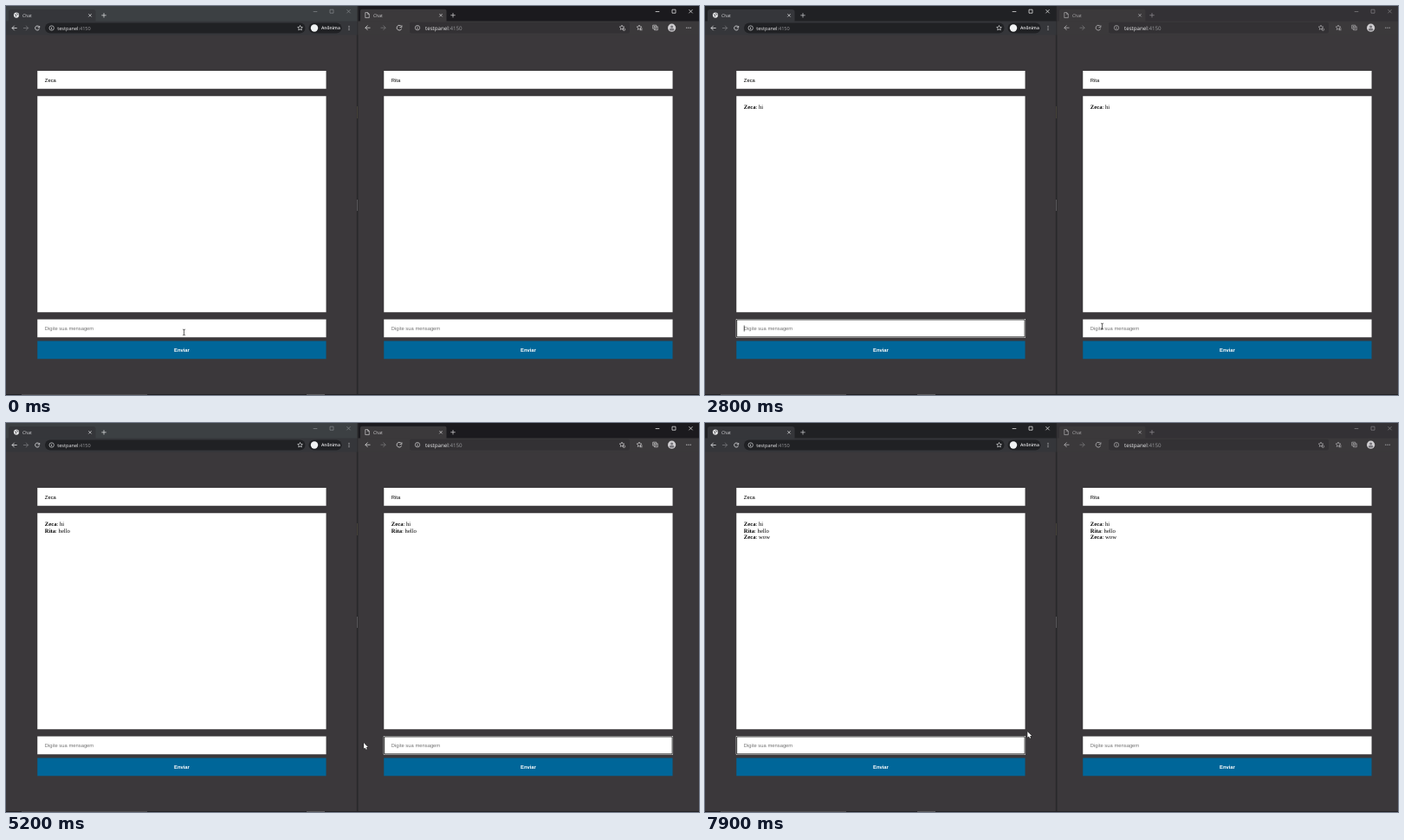
An HTML page with a canvas for the animation above (8000 ms loop, 800 px wide and 450 px high).

```html
<!DOCTYPE html>
<html lang="pt-BR">
<head>
<meta charset="utf-8">
<title>Chat</title>
<style>
html, body { margin: 0; width: 100%; height: 100%; overflow: hidden; background: #3b383b; }
canvas { display: block; width: 800px; height: 450px; }
</style>
</head>
<body>
<canvas id="stage" width="800" height="450"></canvas>
<script>
const ctx = document.getElementById('stage').getContext('2d');
const LOOP = 8000, STEP = 100;
const SANS = '"Liberation Sans", Arial, sans-serif';
const SERIF = '"Liberation Serif", Times, serif';
const UI = '"Open Sans", "Noto Sans", sans-serif';
const HOST = 'testpanel', PORT = ':4150';
const USERS = ['Zeca', 'Rita'];
const MESSAGES = [[1700, 'Zeca', 'hi'], [4600, 'Rita', 'hello'], [7100, 'Zeca', 'wow']];

// [time, window, typed text]; every entry also restarts the caret blink
const INPUT = [
  [300, 0, ''], [1000, 0, 'h'], [1100, 0, 'hi'], [1700, 0, ''],
  [2900, 1, ''], [3600, 1, 'h'], [3700, 1, 'he'], [3900, 1, 'hel'],
  [4000, 1, 'hell'], [4200, 1, 'hello'], [4600, 1, ''],
  [5800, 0, ''], [6400, 0, 'w'], [6500, 0, 'wo'], [6800, 0, 'wow'], [7100, 0, '']
];
const ACTIVE = [[0, 1], [200, 0], [2900, 1], [5700, 0]];
const POINTER = [
  [0, 205.5, 377.5], [200, 202, 373.5], [2200, 202, 373.5], [2800, 458.5, 370.5],
  [3000, 456, 370], [4900, 456, 370], [5200, 413, 370.5], [5700, 152, 367.5],
  [5800, 150.5, 367], [7500, 150.5, 367], [7900, 372.3, 357.5]
];

const last = (list, t) => list.filter(k => k[0] <= t).pop();

function box(x, y, w, h, color, r = 0) {
  ctx.fillStyle = color;
  ctx.beginPath();
  ctx.roundRect(x, y, w, h, r);
  ctx.fill();
}

function disc(x, y, r, color) {
  ctx.fillStyle = color;
  ctx.beginPath();
  ctx.arc(x, y, r, 0, 7);
  ctx.fill();
}

function ring(x, y, r, color, width = 0.7, from = 0, to = 7) {
  ctx.strokeStyle = color;
  ctx.lineWidth = width;
  ctx.beginPath();
  ctx.arc(x, y, r, from, to);
  ctx.stroke();
}

function path(d, x, y, color, width = 0.7) {
  ctx.save();
  ctx.translate(x, y);
  ctx.strokeStyle = color;
  ctx.lineWidth = width;
  ctx.stroke(new Path2D(d));
  ctx.restore();
}

function text(s, x, y, font, color) {
  ctx.font = font;
  ctx.fillStyle = color;
  ctx.fillText(s, x, y);
  return x + ctx.measureText(s).width;
}

const cross = (x, y, r, c) => path(`M${-r} ${-r}L${r} ${r}M${r} ${-r}L${-r} ${r}`, x, y, c);
const plus = (x, y, c) => path('M-2.7 0H2.7M0 -2.7V2.7', x, y, c);

function arrow(x, y, dir, color) {
  path(`M${3 * dir} 0H${-2.7 * dir}M0 -2.7L${-2.7 * dir} 0L0 2.7`, x, y, color, 0.8);
}

function reload(x, y, r, color) {
  ring(x, y, r, color, 0.8, 0.4, 5.6);
  path(`M${r} ${-r}V-0.5H0.5`, x, y, color, 0.8);
}

function star(x, y, r, color) {
  let d = '';
  for (let i = 0; i < 10; i++) {
    const a = i * Math.PI / 5 - Math.PI / 2, q = i % 2 ? r * 0.48 : r;
    d += (i ? 'L' : 'M') + q * Math.cos(a) + ' ' + q * Math.sin(a);
  }
  path(d + 'Z', x, y, color, 0.65);
}

function info(x, y, color) {
  ring(x, y, 2.7, color, 0.65);
  box(x - 0.35, y - 0.4, 0.7, 1.9, color);
  box(x - 0.35, y - 1.6, 0.7, 0.7, color);
}

function controls(x, color) {
  path('M-2.3 0.3H2.3', x, 6.2, color);
  path('M-2 -2H2V2H-2Z', x + 19, 6.2, color);
  cross(x + 38.5, 6.2, 2.1, color);
}

function address(x, y, size) {
  const font = `${size}px ${UI}`;
  text(PORT, text(HOST, x, y, font, '#e8e8ea'), y, font, '#98999c');
}

function leftBrowser(active) {
  const ink = '#e4e5e7';
  box(0, 0, 405.5, 18, active ? '#202124' : '#3c4043');
  box(3, 4, 100.5, 15, '#35363a', [3, 3, 0, 0]);
  box(0, 17.5, 405.5, 16, '#35363a');
  disc(12, 10.6, 3.1, '#e4e5e7');
  path('M-2 -0.9L0 0L-0.8 2M0.6 -2.4L1 -0.9L2.6 -0.4', 12, 10.6, '#47484c', 0.8);
  text('Chat', 19, 12.6, `5px ${UI}`, '#dfe0e3');
  cross(97, 10.8, 1.7, ink);
  plus(113, 10.8, active ? '#cfd0d3' : ink);
  controls(357, active ? '#f4f4f4' : '#85888b');
  arrow(9.7, 25.5, 1, ink);
  arrow(23, 25.5, -1, '#77787b');
  reload(36.2, 25.5, 2.5, ink);
  box(45, 19.6, 300.5, 11.8, '#202124', 5.9);
  info(52.7, 25.5, ink);
  address(59.2, 27.5, 5.6);
  star(339.5, 25.5, 3, ink);
  box(349.5, 19.6, 38, 11.8, '#202124', 5.9);
  disc(356, 25.5, 4.2, '#f1f3f4');
  text('Anônima', 364, 27.3, `600 5px ${UI}`, '#eeeef0');
  for (const dy of [-2, 0, 2]) disc(396, 25.5 + dy, 0.6, ink);
}

function rightBrowser(active) {
  const ink = active ? '#d8d7d9' : '#b5b4b6';
  const bar = '#3b393b';
  box(406.5, 0, 393.5, 18, active ? '#1b1a1e' : '#333135');
  box(409, 3.7, 99.5, 14.5, bar, [2, 2, 0, 0]);
  box(406.5, 17.5, 393.5, 16, bar);
  path('M-2.2 -3H0.7L2.3 -1.3V3H-2.2ZM0.6 -3V-1.2H2.3', 417, 10.6, ink, 0.65);
  text('Chat', 424, 12.5, `5px ${UI}`, ink);
  cross(502, 10.7, 1.7, ink);
  plus(516, 10.7, active ? ink : '#918f92');
  controls(752, active ? '#f4f4f4' : '#858386');
  arrow(417.5, 25.2, 1, ink);
  arrow(435.5, 25.2, -1, '#777578');
  reload(454, 25.2, 2.9, ink);
  box(466, 18.8, 254, 12.8, '#333134', 2);
  info(475, 25.2, ink);
  address(484, 27.5, 6.2);
  star(711, 25, 2.9, ink);
  ring(713.4, 27.2, 1.3, ink, 0.6);
  star(731, 25, 3, ink);
  path('M0.5 2.8H3.6M1 1.1H3.8', 731, 25, ink, 0.6);
  path('M-2.8 -2.8H1.2V1.2H-2.8ZM-1 1.4V2.8H2.8V-1.2H1.3M-0.8 -2V0.4M-2 -0.8H0.4', 749.5, 25, ink, 0.65);
  disc(768.6, 25.2, 4.6, '#cfcdd0');
  disc(768.6, 23.9, 1.5, '#77757a');
  box(765.9, 26, 5.4, 2.4, '#77757a', [1.5, 1.5, 1, 1]);
  for (const dx of [-2.2, 0, 2.2]) disc(788 + dx, 25.2, 0.6, ink);
}

function caret(x) {
  box(x, 369.6, 0.6, 7, '#000');
}

function chat(side, t) {
  const x = 36.25 + side * 400, tx = x + 8.6, w = 333.3;
  const body = '5.833px ' + SANS;
  box(x, 75, w, 20.8, '#fff');
  text(USERS[side], tx, 87.5, body, '#000');

  box(x, 104.2, w, 250, '#fff');
  MESSAGES.filter(m => m[0] <= t).forEach(([, name, words], i) => {
    const y = 119 + i * 7.5;
    const end = text(name, tx, y, 'bold 6.667px ' + SERIF, '#000');
    text(': ' + words, end, y, '6.667px ' + SERIF, '#000');
  });

  const entry = last(INPUT, t);
  const focused = entry && entry[1] === side;
  const typed = focused ? entry[2] : '';
  if (focused) {
    box(x - 0.5, 362, w + 1, 21.8, '#fff', 0.8);
    path(`M0 0H${w - 0.8}V20H0Z`, x + 0.4, 362.9, '#101010', 0.9);
  } else {
    box(x, 362.5, w, 20.8, '#fff');
  }
  const end = text(typed || 'Digite sua mensagem', tx, 375, body, typed ? '#000' : '#757575');
  if (focused && Math.floor((t - entry[0]) / 500) % 2 === 0) caret(typed ? end : tx);

  box(x, 387.5, w, 20.8, '#006699');
  ctx.textAlign = 'center';
  text('Enviar', x + w / 2, 400, 'bold 5.833px ' + SANS, '#fff');
  ctx.textAlign = 'left';
}

function pointer(t) {
  const a = last(POINTER, t);
  const b = POINTER[POINTER.indexOf(a) + 1] || a;
  let p = b === a ? 0 : (t - a[0]) / (b[0] - a[0]);
  p = p * p * (3 - 2 * p);
  const x = a[1] + (b[1] - a[1]) * p, y = a[2] + (b[2] - a[2]) * p;
  const overField = y > 362 && y < 384 && (x < 369.6 || x > 436.2);
  if (overField) {
    path('M-1.5 -3.3H-0.4L0 -2.9L0.4 -3.3H1.5M0 -2.9V2.9M-1.5 3.3H-0.4L0 2.9L0.4 3.3H1.5', x, y, '#111', 0.65);
    return;
  }
  ctx.save();
  ctx.translate(x, y);
  const shape = new Path2D('M0 -0.5V6.3L1.6 4.9L2.7 7.2L3.8 6.7L2.8 4.5H4.9Z');
  ctx.strokeStyle = '#111';
  ctx.lineWidth = 0.7;
  ctx.stroke(shape);
  ctx.fillStyle = '#fff';
  ctx.fill(shape);
  ctx.restore();
}

function backdrop(active) {
  box(0, 0, 800, 450, '#3b383b');
  box(404.8, 0, 1.7, 449, '#29282b');
  box(405, 116, 0.8, 14, '#4d493e');
  box(405, 224, 0.8, 13, '#656367');
  box(0, 449, 800, 1, '#222124');
  box(18, 449.2, 145, 0.8, '#5c5b5d');
  box(active ? 347 : 245, 449.2, 21, 0.8, '#6a696b');
}

function draw(t) {
  const active = last(ACTIVE, t)[1];
  backdrop(active);
  leftBrowser(active === 0);
  rightBrowser(active === 1);
  chat(0, t);
  chat(1, t);
  pointer(t);
}

ctx.textRendering = 'geometricPrecision';
const start = performance.now();
function tick() {
  const t = (performance.now() - start) % LOOP;
  draw(Math.floor(t / STEP) * STEP);
  requestAnimationFrame(tick);
}
tick();
</script>
</body>
</html>
```
